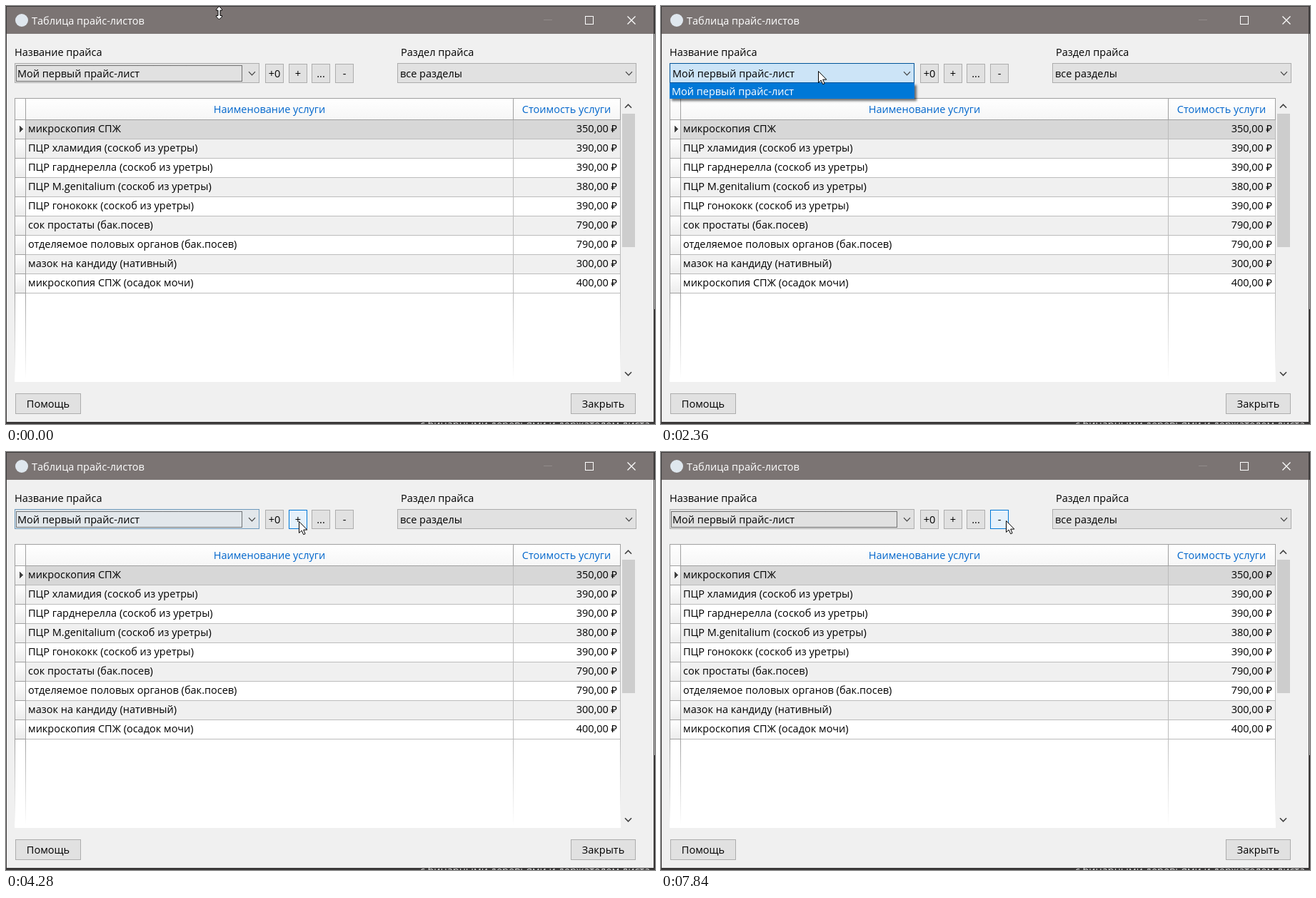
Animation, 909 px wide and 586 px high, one loop 8 s. Source, as an HTML page with a canvas:

```html
<!DOCTYPE html>
<html lang="ru">
<head>
<meta charset="utf-8">
<title>Таблица прайс-листов</title>
<style>
html, body { margin: 0; width: 100%; height: 100%; overflow: hidden; background: #f0f0f0; }
canvas { display: block; }
</style>
</head>
<body>
<canvas id="stage" width="909" height="586"></canvas>
<script>
const ctx = document.getElementById('stage').getContext('2d');
const LOOP = 8000, STEP = 40, ROW = 27;
const FONT = '14.5px "Open Sans", "Noto Sans", sans-serif';
const LIST = 'Мой первый прайс-лист';
const EDGE = '#a0a0a0', GRID = '#bcbcbc', INK = '#404040';

const services = [
  ['микроскопия СПЖ', 350],
  ['ПЦР хламидия (соскоб из уретры)', 390],
  ['ПЦР гарднерелла (соскоб из уретры)', 390],
  ['ПЦР M.genitalium (соскоб из уретры)', 380],
  ['ПЦР гонококк (соскоб из уретры)', 390],
  ['сок простаты (бак.посев)', 790],
  ['отделяемое половых органов (бак.посев)', 790],
  ['мазок на кандиду (нативный)', 300],
  ['микроскопия СПЖ (осадок мочи)', 400]
];

const moves = [
  { from: 440, to: 920, x: 176, y: 88 },
  { from: 920, to: 1200, x: 214, y: 71 },
  { from: 1560, to: 1800, x: 216, y: 86 },
  { from: 2000, to: 2360, x: 220, y: 91 },
  { from: 2720, to: 3160, x: 218, y: 98 },
  { from: 3360, to: 3640, x: 210, y: 112 },
  { from: 3640, to: 4160, x: 410, y: 97 },
  { from: 5680, to: 6080, x: 435, y: 97 },
  { from: 7440, to: 7840, x: 483, y: 96 }
];
const tips = [
  { text: 'Создать прайс из текущего (Shift+Ctrl+2)', x: 410, from: 4960, to: 5720 },
  { text: 'Переименовать текущий прайс (Shift+Ctrl+3)', x: 435, from: 6400, to: 7400 }
];

const ramp = (t, a, b) => Math.min(1, Math.max(0, (t - a) / (b - a)));
const ease = p => p * p * (3 - 2 * p);
const pulse = (t, a, b, c, d) => ramp(t, a, b) - ramp(t, c, d);
const mix = (a, b, p) => `rgb(${a.map((v, i) => Math.round(v + (b[i] - v) * p))})`;

function pointerAt(t) {
  let x = 298, y = 2;
  for (const m of moves) {
    const p = ease(ramp(t, m.from, m.to));
    x += (m.x - x) * p;
    y += (m.y - y) * p;
  }
  return [Math.round(x), Math.round(y)];
}

function rect(x, y, w, h, fill) {
  ctx.fillStyle = fill;
  ctx.fillRect(x, y, w, h);
}

function frame(x, y, w, h, fill, edge) {
  rect(x, y, w, h, edge);
  rect(x + 1, y + 1, w - 2, h - 2, fill);
}

function shade(x, y, w, h, from, to) {
  const g = ctx.createLinearGradient(0, y, 0, y + h);
  g.addColorStop(0, from);
  g.addColorStop(1, to);
  rect(x, y, w, h, g);
}

function text(s, x, y, fill = '#000', align = 'left') {
  ctx.fillStyle = fill;
  ctx.textAlign = align;
  ctx.fillText(s, x, y);
}

function line(points, color, width = 1.2) {
  ctx.beginPath();
  points.forEach(p => ctx.lineTo(...p));
  ctx.strokeStyle = color;
  ctx.lineWidth = width;
  ctx.stroke();
}

function arrow(points, x, y) {
  ctx.beginPath();
  points.forEach(p => ctx.lineTo(x + p[0], y + p[1]));
  ctx.closePath();
  ctx.fillStyle = '#fff';
  ctx.fill();
  ctx.strokeStyle = '#000';
  ctx.lineWidth = 1;
  ctx.stroke();
}

const chevron = (x, y, dir, width) =>
  line([[x - 4.5, y - 2.3 * dir], [x, y + 2.3 * dir], [x + 4.5, y - 2.3 * dir]], INK, width);

function button(label, x, y, w, h, hot) {
  frame(x, y, w, h, hot ? '#e5f1fb' : '#e1e1e1', hot ? '#0078d7' : '#adadad');
  text(label, x + w / 2, y + h / 2 + 5.5, '#000', 'center');
}

function shadowed(draw) {
  ctx.save();
  ctx.shadowColor = 'rgba(0,0,0,.55)';
  ctx.shadowBlur = 3;
  ctx.shadowOffsetX = ctx.shadowOffsetY = 3;
  draw();
  ctx.restore();
}

function drawWindow() {
  rect(0, 0, 909, 586, '#3a3838');
  rect(908, 39, 1, 386, '#c9c9c9');
  text('с бинарными деревьями и держателем листа', 580, 592, '#ddd');
  rect(1, 1, 906, 582, '#f0f0f0');
  rect(1, 1, 906, 38, '#7b7473');

  ctx.beginPath();
  ctx.arc(22, 20, 9, 0, 7);
  ctx.fillStyle = '#dfe7ee';
  ctx.fill();
  text('Таблица прайс-листов', 36, 26, '#fff');
  rect(753, 19, 12, 1, '#918b8a');
  ctx.strokeStyle = '#fff';
  ctx.lineWidth = 1;
  ctx.strokeRect(811.5, 14.5, 11, 11);
  for (const d of [-5.5, 5.5]) line([[876 - d, 14.5], [876 + d, 25.5]], '#fff');

  text('Название прайса', 12, 70);
  text('Раздел прайса', 553, 70);
  frame(548, 80, 335, 28, '#e1e1e1', '#adadad');
  text('все разделы', 552, 100);
  chevron(872.5, 94.5, 1);
  button('Помощь', 13, 543, 92, 29);
  button('Закрыть', 791, 543, 91, 29);
}

function drawTable() {
  const top = 160, end = top + services.length * ROW;
  rect(12, 129, 849, 398, '#fff');
  shade(13, 130, 847, 29, '#fff', '#f6f6f6');
  services.forEach(([name, price], i) => {
    const y = top + i * ROW;
    rect(28, y, 832, ROW - 1, i === 0 ? '#d7d7d7' : i % 2 ? '#f0f0f0' : '#fff');
    rect(28, y + ROW - 1, 832, 1, GRID);
    shade(13, y, 14, ROW - 1, '#fff', '#ececec');
    rect(12, y + ROW - 1, 16, 1, EDGE);
    text(name, 31, y + 17);
    text(price + ',00 ₽', 856, y + 17, '#000', 'right');
  });
  for (const y of [129, 159]) rect(12, y, 849, 1, EDGE);
  for (const x of [12, 27, 710, 860]) {
    const color = x < 30 ? EDGE : GRID;
    rect(x, 129, 1, 31, EDGE);
    rect(x, top, 1, end - top, color);
    shade(x, end, 1, 120, color, '#fff');
  }
  text('Наименование услуги', 369, 150, '#0066cc', 'center');
  text('Стоимость услуги', 785, 150, '#0066cc', 'center');
  for (let i = 0; i < 5; i++) rect(19 + i, 168 + i, 1, 9 - 2 * i, INK);

  rect(861, 129, 22, 398, '#f0f0f0');
  rect(863, 151, 18, 187, '#cdcdcd');
  chevron(871.5, 140.5, -1, 1.6);
  chevron(871.5, 515.5, 1, 1.6);
}

function drawCombo(t) {
  const open = t >= 1720 && t < 2800;
  const glow = pulse(t, 800, 1000, 1060, 1200) + pulse(t, 1520, 1640, 3800, 4560);
  const fill = open ? '#cce4f7' : mix([225, 225, 225], [229, 241, 251], glow);
  const edge = open ? '#005499' : mix([173, 173, 173], [0, 120, 215], glow);
  frame(12, 80, 343, 28, fill, edge);
  text(LIST, 16, 100);
  chevron(344.5, 94.5, 1);
  if (open) {
    shadowed(() => rect(12, 108, 343, 22, '#0078d7'));
    text(LIST, 15, 125, '#fff');
  } else {
    ctx.setLineDash([1, 1]);
    ctx.strokeStyle = '#000';
    ctx.lineWidth = 1;
    ctx.strokeRect(14.5, 83.5, 316, 22);
    ctx.setLineDash([]);
  }
}

function drawButtons(x, y) {
  ['+0', '+', '...', '-'].forEach((label, i) => {
    const left = Math.round(363 + 32.6 * i);
    button(label, left, 81, 26, 27, x >= left && x < left + 26 && y < 108);
  });
}

function drawTip({ text: label, x, from, to }, t) {
  const w = Math.round(ctx.measureText(label).width) + 6;
  ctx.globalAlpha = pulse(t, from, from + 200, to, to + 240);
  shadowed(() => rect(x, 116, w, 25, '#646464'));
  rect(x + 1, 117, w - 2, 23, '#fff');
  text(label, x + 2, 134);
  ctx.globalAlpha = 1;
}

function drawPointer(t, x, y) {
  if (t < 440) {
    const half = [[0, 0], [4, 4], [4, 5.5], [1.5, 5.5], [1.5, 13], [4, 13], [4, 14.5], [0, 18.5]];
    const mirror = half.slice(1, -1).reverse().map(([a, b]) => [-a, b]);
    arrow([...half, ...mirror], 298.5, 0.5);
  } else {
    arrow([[0, 0], [0, 16], [3.6, 12.6], [6.2, 18.2], [8.6, 17.2], [6.2, 11.6], [11.3, 11.6]], x + 0.5, y + 0.5);
  }
}

function draw(now) {
  const t = Math.floor(now % LOOP / STEP) * STEP;
  const [x, y] = pointerAt(t);
  ctx.font = FONT;
  drawWindow();
  drawTable();
  drawCombo(t);
  drawButtons(x, y);
  tips.forEach(tip => drawTip(tip, t));
  drawPointer(t, x, y);
}

const start = performance.now();
function tick() {
  draw(performance.now() - start);
  requestAnimationFrame(tick);
}
tick();
</script>
</body>
</html>
```
